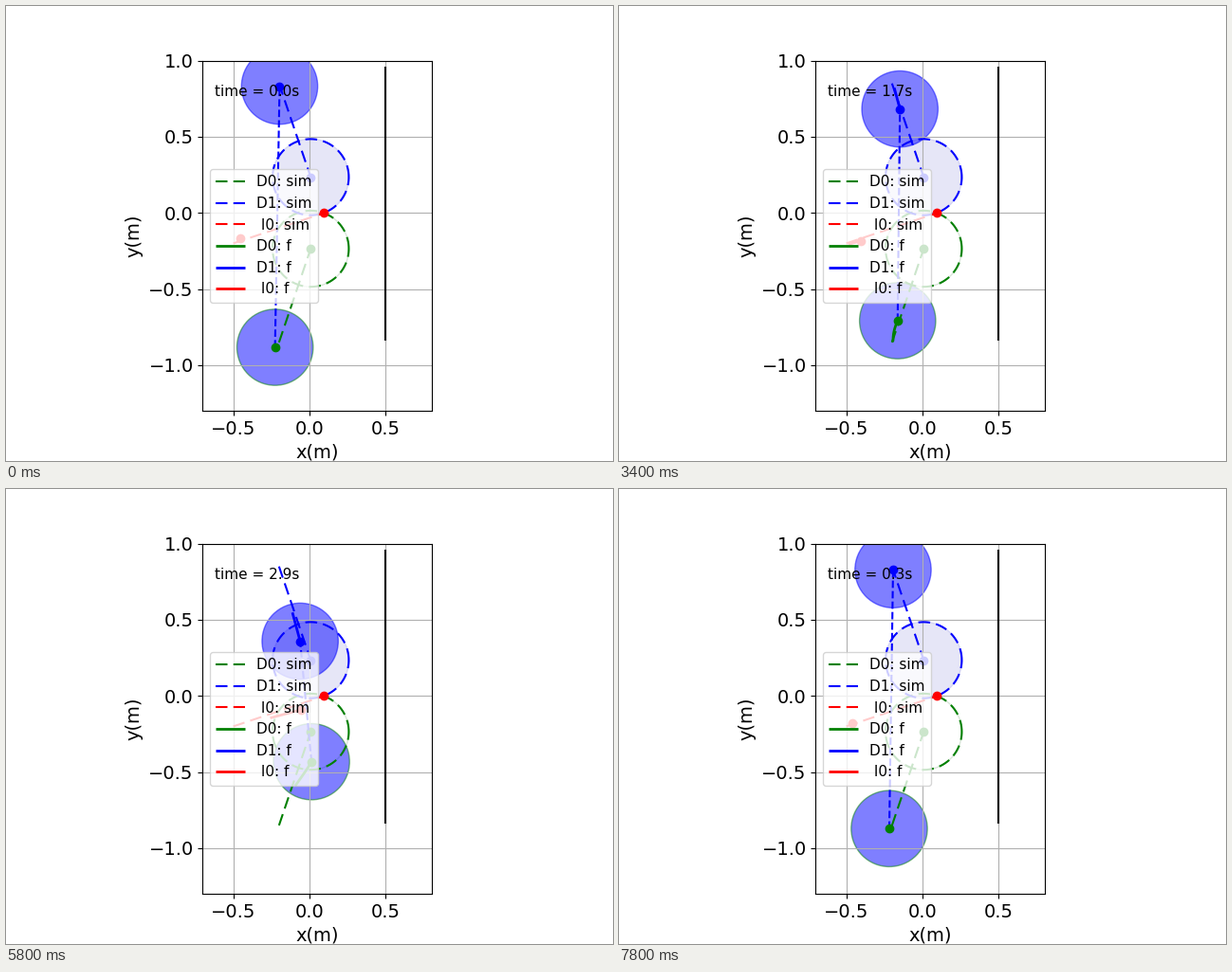
Recreate the animation shown at these times as a matplotlib script. Size 640 by 480 pixels, loop 8000 ms.

```python
import numpy as np
import matplotlib.pyplot as plt
from matplotlib.animation import FuncAnimation
from matplotlib.patches import Circle

FRAMES, STEP_MS = 40, 200
CYCLE = 36                  # steps of 0.1 s before the run starts over
PUSH, STOP = 1.2, 3.5       # seconds: slow drift, then a push to the end
TRAIL = 0.7                 # seconds of visible trail
RADIUS = 0.25

plt.rcParams["font.family"] = "DejaVu Sans"
plt.rcParams["font.size"] = 14
plt.rcParams["text.kerning_factor"] = 6


def linear(s):
    return s


def soft(s):
    return s ** 0.93


def smooth(s):
    return s * s * (3 - 2 * s)


def soft_smooth(s):
    return smooth(soft(s))


class Body:
    """A point that drifts from a to b, then is pushed from b to c."""

    def __init__(self, a, b, c, ease_x, ease_y):
        self.axes = list(zip(a, b, c, (ease_x, ease_y)))

    def at(self, t):
        drift = np.clip(t / PUSH, 0, 1)
        push = np.clip((t - PUSH) / (STOP - PUSH), 0, 1)
        return [a + (b - a) * drift + (c - b) * ease(push)
                for a, b, c, ease in self.axes]


D0 = Body((-0.226, -0.882), (-0.193, -0.838), (0.055, -0.30), smooth, soft)
D1 = Body((-0.196, 0.832), (-0.184, 0.817), (-0.018, 0.198), linear, linear)
I0 = Body((-0.451, -0.167), (-0.479, -0.204), (0.022, -0.07),
          soft_smooth, soft_smooth)

fig, ax = plt.subplots(figsize=(6.4, 4.8), dpi=100)
ax.set_aspect("equal")
ax.set_xlim(-0.7, 0.8)
ax.set_ylim(-1.3, 1.0)
ax.set_xticks(np.arange(-0.5, 0.6, 0.5))
ax.set_yticks(np.arange(-1, 1.1, 0.5))
ax.set_xlabel("x(m)")
ax.set_ylabel("y(m)")
ax.grid(True)

# Simulated disks, paths and end points
DASH = dict(ls="--", lw=1.5, dashes=(6, 3))
angle = np.linspace(0, 2 * np.pi, 200)
for cy, color, fill, rim in ((-0.235, "green", "none", "#d8e6d8"),
                             (0.235, "blue", "#e6e6f7", "#d4d4f4")):
    ax.add_patch(Circle((0.008, cy), RADIUS, fc=fill, ec=rim))
    ax.plot(0.008 + RADIUS * np.cos(angle), cy + RADIUS * np.sin(angle),
            color=color, **DASH)

for label, color, start, end in (
        ("D0: sim", "green", (-0.2, -0.85), (0.008, -0.235)),
        ("D1: sim", "blue", (-0.2, 0.85), (0.008, 0.235)),
        (" I0: sim", "red", (-0.5, -0.2), (0.096, 0.0))):
    ax.plot(*zip(start, end), color=color, label=label, **DASH)
    ax.plot(*end, "o", color=color)

ax.plot([0.5, 0.5], [-0.83, 0.955], color="black", lw=1.5)

# Moving parts
link, = ax.plot([], [], "--", color="blue", lw=1.5)
movers = []
for body, label, color in ((D0, "D0: f", "green"), (D1, "D1: f", "blue"),
                           (I0, " I0: f", "red")):
    trail, = ax.plot([], [], color=color, lw=2, label=label,
                     solid_capstyle="butt")
    dot, = ax.plot([], [], "o", color=color)
    disk = Circle((0, 0), RADIUS, fc="blue", ec=color, alpha=0.5)
    if body is not I0:
        ax.add_patch(disk)
    movers.append((body, trail, dot, disk))

clock = ax.text(0.05, 0.9, "", transform=ax.transAxes, fontsize=11)
ax.legend(loc="center left", fontsize=11)


def draw(i):
    t = (i % CYCLE) * 0.1
    past = np.linspace(max(0, t - TRAIL), t, 15)
    for body, trail, dot, disk in movers:
        x, y = body.at(t)
        trail.set_data(*body.at(past))
        dot.set_data([x], [y])
        disk.center = x, y
    link.set_data(*zip(D0.at(t), D1.at(t)))
    clock.set_text(f"time = {t:.1f}s")
    return []


anim = FuncAnimation(fig, draw, frames=FRAMES, interval=STEP_MS,
                     init_func=lambda: draw(0), repeat=True, repeat_delay=0)
plt.show()
```
